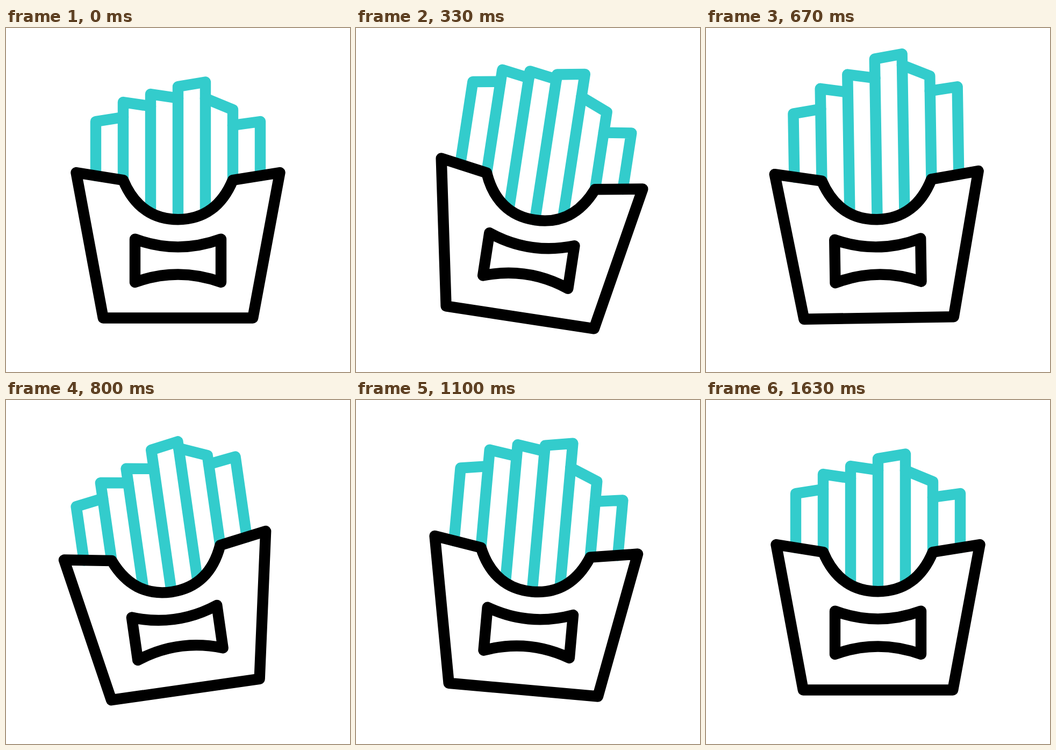
Write an HTML page that moves like this. It is 640x640 px and loops after 2 s.

```html
<!DOCTYPE html>
<html lang="en">
<head>
<meta charset="utf-8">
<title>Fries</title>
<style>
  html, body { margin: 0; width: 100%; height: 100%; overflow: hidden; background: #fff; }
  svg { display: block; width: 100%; height: 100%; }
  path { fill: none; stroke: #000; stroke-width: 20.4; stroke-linecap: round; stroke-linejoin: round; }
  #fries path { stroke: #3cc; }
</style>
</head>
<body>
<svg viewBox="0 0 640 640">
  <g id="pack">
    <g id="fries"></g>
    <path d="M130.5 269L218 283C238 331 272 356.2 320 356.2S402 331 422 283L509.5 269L459.2 539.5H180.8Z"/>
    <path d="M240 392.7Q320 422 400 392.7V473Q320 444 240 473Z"/>
  </g>
</svg>
<script>
const LOOP = 2000, FPS = 30;

// Top edge runs from a to b; feet are the y where the left and right legs end.
// Keys are in steps: start, first peak, low, second peak, rest.
const fries = [
  { a: [167, 174], b: [218, 166], left: 275, peak: 61, keys: [0, 12.5, 24, 31.3, 41.3] },
  { a: [218, 138], b: [269, 145.5], left: 283, peak: 64, keys: [1.8, 13.8, 25, 32.4, 42.6] },
  { a: [269, 123], b: [320, 130.5], left: 343, peak: 64, keys: [3, 15.2, 26, 33.9, 44] },
  { a: [320, 109], b: [371, 100.5], left: 356, right: 343, peak: 61.5, keys: [4, 17.2, 28.1, 36, 45.3] },
  { a: [371, 131], b: [422, 152], right: 283, peak: 62, keys: [5.8, 19.3, 30.3, 38, 47] },
  { a: [422, 181], b: [473, 174], right: 275, peak: 63, keys: [7.8, 20.8, 31.8, 40, 49] },
];
const swing = { keys: [5.2, 13, 24.6, 31.4, 39.7], values: [0, 12.95, -8.3, 5.65, 0] };

const pack = document.getElementById('pack');
const group = document.getElementById('fries');
for (const fry of fries) {
  fry.path = group.appendChild(document.createElementNS(group.namespaceURI, 'path'));
  fry.values = [0, fry.peak, 0, 38, 0];
}

const smooth = u => u * u * (3 - 2 * u);

function valueAt({ keys, values }, step) {
  if (step <= keys[0]) return values[0];
  const next = keys.findIndex(key => key > step);
  if (next < 0) return values[values.length - 1];
  const u = (step - keys[next - 1]) / (keys[next] - keys[next - 1]);
  return values[next - 1] + (values[next] - values[next - 1]) * smooth(u);
}

function fryPath({ a, b, left, right }, lift) {
  const start = left ? `M${a[0]} ${left}V${a[1] - lift}` : `M${a[0]} ${a[1] - lift}`;
  return `${start}L${b[0]} ${b[1] - lift}` + (right ? `V${right}` : '');
}

function draw() {
  const step = Math.floor((performance.now() % LOOP + 4) * FPS / 1000) % (LOOP * FPS / 1000);
  pack.setAttribute('transform', `rotate(${valueAt(swing, step)} 320 441.5)`);
  for (const fry of fries) fry.path.setAttribute('d', fryPath(fry, valueAt(fry, step)));
  requestAnimationFrame(draw);
}
draw();
</script>
</body>
</html>
```
